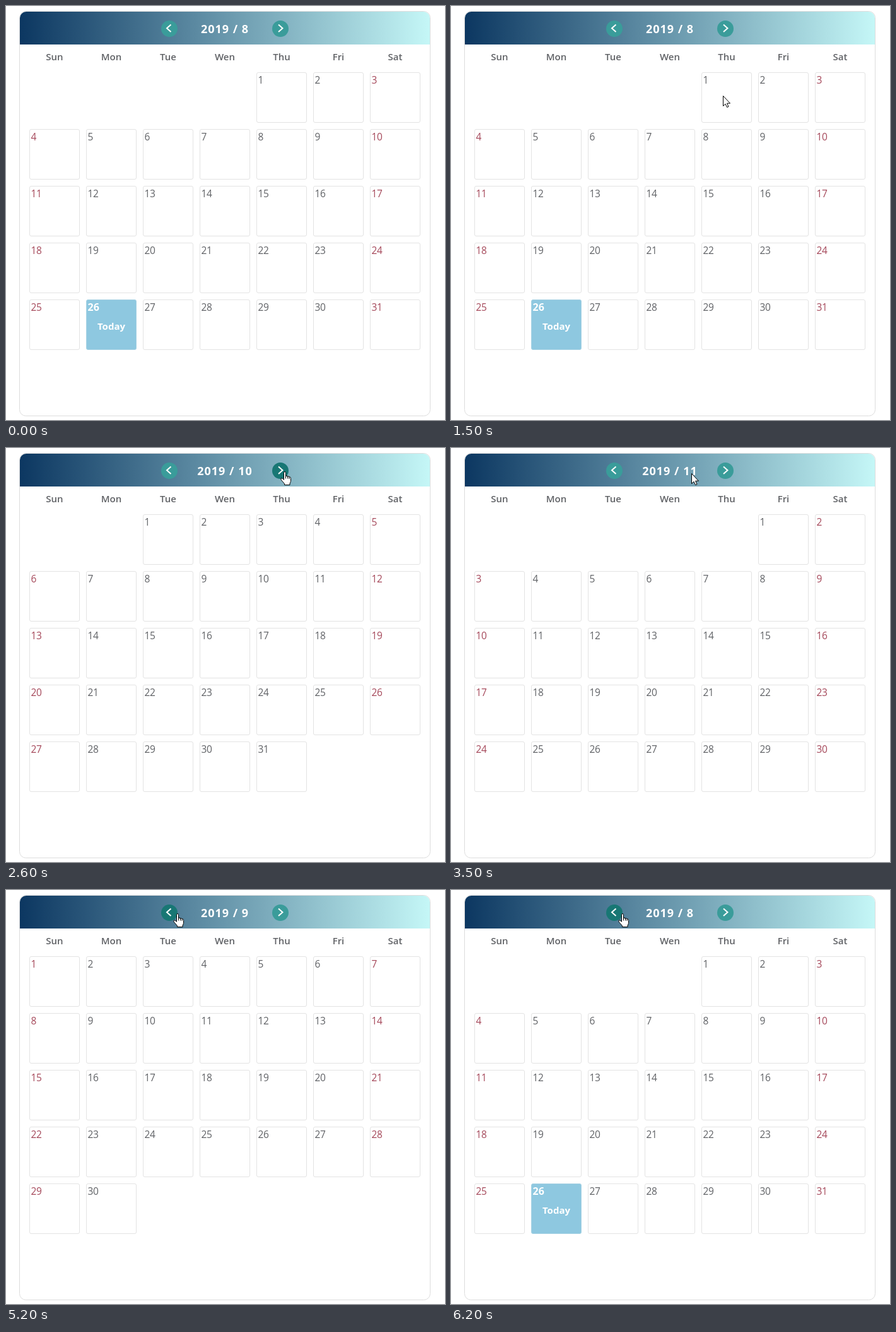
Recreate the animation shown at these times as an HTML page. Size 696 px wide and 656 px high, loop 7.2 s.

```html
<!DOCTYPE html>
<html lang="en">
<head>
<meta charset="utf-8">
<title>Calendar</title>
<style>
  html, body { margin: 0; width: 100%; height: 100%; overflow: hidden; background: #fff; }
  svg { display: block; }
  text { font: 15.5px "Open Sans", "Noto Sans", sans-serif; fill: #606266; }
  .day { letter-spacing: -.35px; }
  .weekend { fill: #a5485a; }
  .weekday { font-size: 15px; font-weight: 600; text-anchor: middle; }
  .cell { fill: #fff; stroke: #e3e3e3; }
  .today { fill: #8ec8e0; stroke: #a9d3e4; }
  .bold { font-size: 16px; font-weight: 700; fill: #fff; }
  .label { font-size: 15px; font-weight: 700; fill: #fff; text-anchor: middle; }
  #title { font-size: 18px; font-weight: 700; fill: #fff; letter-spacing: 1px; text-anchor: middle; }
  .button { fill: #3a9c9a; }
  .button.hover { fill: #187774; }
  .chevron { fill: none; stroke: #fff; stroke-width: 2; }
  .pointer { fill: #fff; stroke: #000; stroke-linejoin: round; }
</style>
</head>
<body>
<svg width="696" height="656" viewBox="0 0 696 656">
  <defs>
    <linearGradient id="sky">
      <stop stop-color="#0c3761"/>
      <stop offset="1" stop-color="#c5f7f7"/>
    </linearGradient>
  </defs>
  <rect x="21.5" y="8.5" width="651" height="641" rx="10" fill="#fff" stroke="#dcdcdc"/>
  <path d="M22 61V19A10 10 0 0 1 32 9H662A10 10 0 0 1 672 19V61Z" fill="url(#sky)"/>
  <circle class="button" cx="259" cy="36" r="13"/>
  <circle class="button" cx="435" cy="36" r="13"/>
  <path class="chevron" d="M261.5 29.5L255 35.2L261.5 41M432 29.5L438.5 35.2L432 41"/>
  <text id="title" x="347" y="43"></text>
  <g id="weekdays"></g>
  <g id="days"></g>
  <path id="arrow" class="pointer" d="M.5.5V16.5L4 13.2L6.6 18.5L9 17.5L6.6 12.2H11.5Z"/>
  <path id="hand" class="pointer" d="M5.5 2.5Q5.5.5 7 .5T8.5 2.5V7L14.5 8.5Q16.5 9 16.5 11.5V15.5Q16 17.5 15 19V21.5H6.5V19.5L2 14.5Q.2 12.3 1 11.3Q2 10.3 4 11.8L5.5 13.3ZM8.5 7V11.5M11.5 8V11.5M14 8.8V12"/>
</svg>
<script>
const LOOP = 7200, STEP = 100, YEAR = 2019;
const PITCH = 90, LEFT = 37, TOP = 105;
const months = [[0, 8], [1800, 9], [2600, 10], [3500, 11], [4300, 10], [5100, 9], [5900, 8]];
// Pointer moves: start, end, from, to
const moves = [
  [1000, 1700, [390, 569], [441, 37]],
  [3500, 4200, [381, 40], [273, 36]],
  [4300, 4400, [271, 37], [271, 37]]
];

const $ = id => document.getElementById(id);
const buttons = [...document.querySelectorAll('.button')];
const latest = (list, t) => list.filter(item => item[0] <= t).pop();
const ease = p => p * p * (3 - 2 * p);

$('weekdays').innerHTML = ['Sun', 'Mon', 'Tue', 'Wen', 'Thu', 'Fri', 'Sat']
  .map((name, i) => `<text class="weekday" x="${77 + i * PITCH}" y="86">${name}</text>`).join('');

function dayCell(day, slot, isToday) {
  const col = slot % 7;
  const x = LEFT + col * PITCH, y = TOP + Math.floor(slot / 7) * PITCH;
  const style = isToday ? 'bold' : col % 6 ? 'day' : 'day weekend';
  return `<rect class="cell ${isToday ? 'today' : ''}" x="${x + .5}" y="${y + .5}" width="79" height="79" rx="2.5"/>
    <text class="${style}" x="${x + 2.5}" y="${y + 18}">${day}</text>` +
    (isToday ? `<text class="label" x="${x + 40}" y="${y + 48}">Today</text>` : '');
}

let shown;
function showMonth(month) {
  if (month === shown) return;
  shown = month;
  const first = new Date(YEAR, month - 1, 1).getDay();
  const count = new Date(YEAR, month, 0).getDate();
  $('title').textContent = `${YEAR} / ${month}`;
  $('days').innerHTML = Array.from({ length: count }, (_, i) =>
    dayCell(i + 1, first + i, month === 8 && i === 25)).join('');
}

function showPointer(t) {
  const move = latest(moves, t);
  let x = -99, y = -99;
  if (move) {
    const [start, end, from, to] = move;
    const p = ease(Math.min(1, (t - start) / (end - start)));
    [x, y] = from.map((v, i) => Math.round(v + (to[i] - v) * p));
  }
  const over = buttons.map(b => Math.hypot(x - b.cx.baseVal.value, y - 36) < 14.5);
  buttons.forEach((b, i) => b.classList.toggle('hover', over[i]));
  const onButton = over.includes(true);
  $('arrow').style.display = onButton ? 'none' : '';
  $('hand').style.display = onButton ? '' : 'none';
  $('arrow').setAttribute('transform', `translate(${x} ${y})`);
  $('hand').setAttribute('transform', `translate(${x - 6} ${y})`);
}

function render() {
  const t = Math.floor(performance.now() % LOOP / STEP) * STEP;
  showMonth(latest(months, t)[1]);
  showPointer(t);
  requestAnimationFrame(render);
}
render();
</script>
</body>
</html>
```
